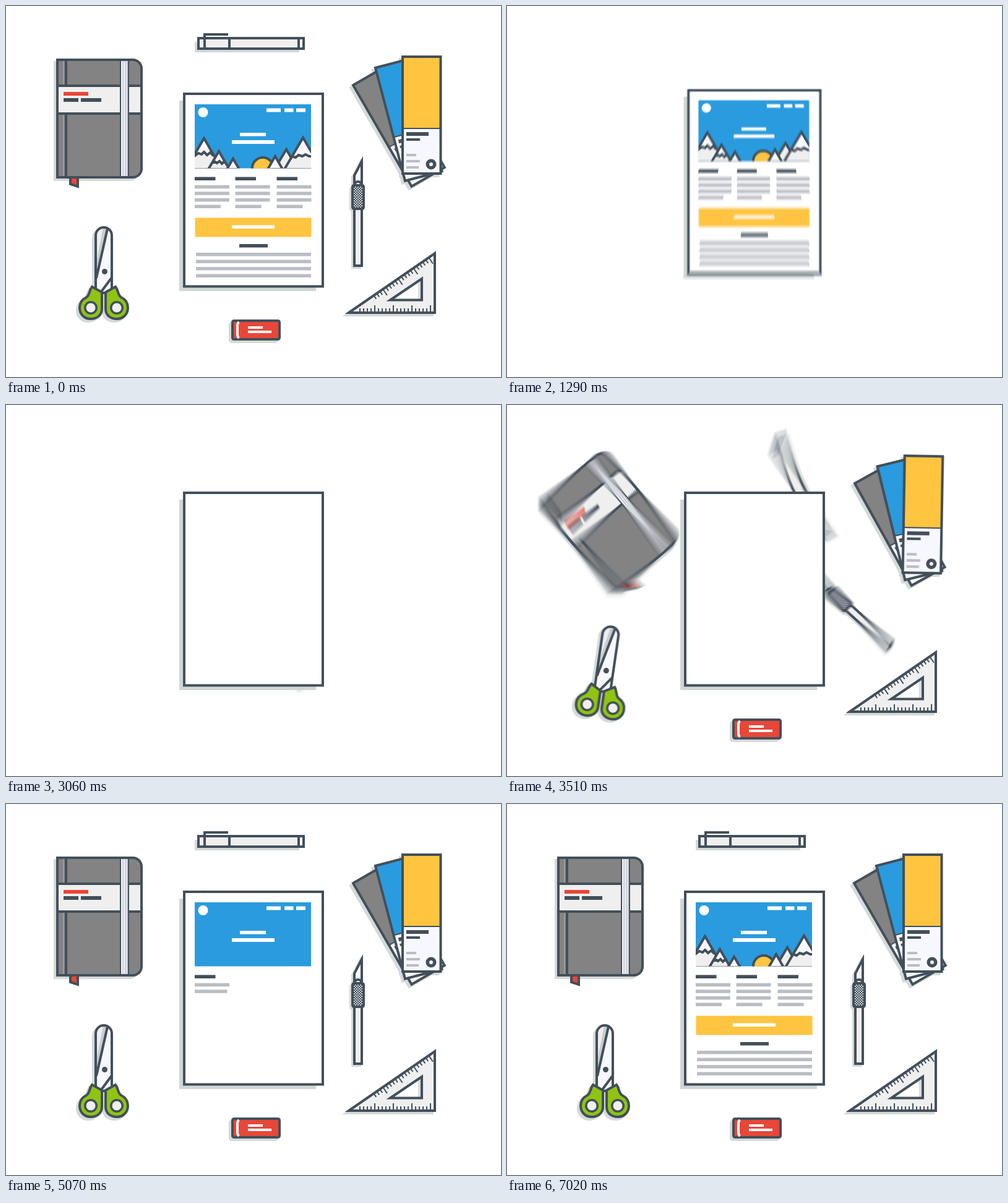
An HTML page with a canvas for the animation above (7.35 s loop, 800 px wide and 600 px high).

```html
<!DOCTYPE html>
<html lang="en">
<head>
<meta charset="utf-8">
<title>Design desk</title>
<style>
html, body { margin: 0; width: 100%; height: 100%; overflow: hidden; background: #fff; }
canvas { display: block; width: 800px; height: 600px; }
</style>
</head>
<body>
<canvas id="stage" width="800" height="600"></canvas>
<script>
const LOOP = 7350, STEP = 30, SHUTTER = 13, SAMPLES = 16, BACK = 1.2;
const INK = '#434f5b', SHADE = '#d3dad8', PALE = '#efefef', ICE = '#f7f7ff', GREY = '#838383',
  BLUE = '#2a9bde', YELLOW = '#ffc540', RED = '#e84738', GREEN = '#8fc412', LINE = '#babdc4', WHITE = '#fff';

const out = document.getElementById('stage').getContext('2d');
const layer = document.createElement('canvas');
layer.width = 800;
layer.height = 600;
const g = layer.getContext('2d');

const clamp = x => Math.max(0, Math.min(1, x));
const span = (t, start, length) => clamp((t - start) / length);
const easeOut = u => 1 - (1 - u) ** 3;
const backIn = (u, s = BACK) => u * u * ((s + 1) * u - s);

function shape(d, fill, width = 4, stroke = INK) {
  const p = new Path2D(d);
  if (fill) { g.fillStyle = fill; g.fill(p); }
  if (width) { g.lineWidth = width; g.strokeStyle = stroke; g.stroke(p); }
}
function bar(x, y, x2, y2, fill) {
  g.fillStyle = fill;
  g.fillRect(x, y, x2 - x, y2 - y);
}
function dot(x, y, r, fill) {
  g.fillStyle = fill;
  g.beginPath();
  g.arc(x, y, r, 0, 7);
  g.fill();
}
function place(x, y, deg, scale, draw) {
  g.save();
  g.translate(x, y);
  g.rotate(deg * Math.PI / 180);
  g.scale(scale, scale);
  draw();
  g.restore();
}
const shade = (d, dx = -4, dy = 4) => place(dx, dy, 0, 1, () => shape(d, SHADE, 4, SHADE));

function pen() {
  bar(305, 58, 474, 75, SHADE);
  shape('M311 52H481V69H311Z', PALE);
  bar(475, 54, 479, 67, WHITE);
  shape('M361 52V69M473 52V69M321 69V46H359');
}

function book() {
  shape('M77 89H200A13 13 0 0 1 213 102V270A13 13 0 0 1 200 283H77Z', SHADE, 0);
  shape('M104 276V288L116 292V276Z', RED);
  const cover = 'M83 87H205A14 14 0 0 1 219 101V263A14 14 0 0 1 205 277H83Z';
  shape(cover, GREY, 0);
  bar(92, 87, 94, 277, '#9b9c98');
  bar(95, 87, 99, 277, INK);
  shape('M83 129H219V174H83Z', PALE);
  bar(93, 139, 133, 145, RED);
  bar(93, 149, 117, 155, INK);
  bar(121, 149, 154, 155, INK);
  bar(184, 87, 199, 277, INK);
  bar(186, 87, 197, 277, ICE);
  for (const x of [188.5, 192, 195]) bar(x, 87, x + 1.5, 277, LINE);
  shape(cover);
}

function scissors() {
  const blade = 'M145 464V371A13 13 0 0 1 171 371V464Z';
  const grip = 'M139 454L155 463V490C155 500 147 506 137 506C126 506 119 498 119 488' +
    'C119 480 124 474 130 471C136 467 134 460 139 454Z';
  const flip = draw => { g.save(); g.translate(316, 0); g.scale(-1, 1); draw(); g.restore(); };
  shade(blade);
  shade(grip);
  flip(() => shade(grip, 4, 4));
  shape(blade, ICE, 0);
  shape('M145 440V371A13 13 0 0 1 164 360Z', '#c9cdd2', 0);
  shape('M145 420V371A13 13 0 0 1 157 358Z', PALE, 0);
  shape('M164 360L146 440M171 439L154 462');
  shape(blade);
  dot(159.5, 429.5, 4.5, INK);
  const handle = () => {
    shape(grip, GREEN);
    dot(137, 488, 11, INK);
    dot(137, 488, 7.5, PALE);
  };
  handle();
  flip(handle);
}

const CARDS = [[561, 128, -30, GREY], [597, 100, -14.7, BLUE], [641, 82, 0, YELLOW]];
function swatches() {
  const card = 'M0 0H61.5V189H0Z';
  for (const [x, y, deg] of CARDS) place(x - 4, y + 4, deg, 1, () => shape(card, SHADE, 4, SHADE));
  for (const [x, y, deg, fill] of CARDS) place(x, y, deg, 1, () => {
    shape(card, ICE, 0);
    bar(0, 0, 61.5, 116, fill);
    bar(0, 115, 61.5, 117, INK);
    bar(6, 122, 42, 128, INK);
    bar(6, 132, 28, 136, INK);
    [16, 22, 20].forEach((w, i) => bar(6, 157 + i * 10, 6 + w, 161 + i * 10, LINE));
    dot(46, 174, 8.5, INK);
    dot(46, 174, 3, ICE);
    shape(card);
  });
}

function knife() {
  const blade = 'M575 251V286H563V274Z', shaft = 'M563 328H575V420H563Z';
  const grip = 'M563 290H575Q578 290 578 293V325Q578 328 575 328H563Q560 328 560 325V293Q560 290 563 290Z';
  [blade, grip, shaft].forEach(d => shade(d, -3, 3));
  shape(blade, ICE);
  shape('M563 290Q564 284 569 284Q574 284 575 290Z', PALE);
  shape(shaft, PALE);
  shape(grip, '#c8cbd0', 0);
  for (let i = 0; i < 9; i++)
    for (let j = i % 2; j < 19; j += 2) bar(560 + i * 2, 290 + j * 2, 562 + i * 2, 292 + j * 2, INK);
  shape(grip);
}

function ruler() {
  const body = 'M554 496L693 400V496Z';
  shade(body);
  shape(body, PALE);
  shape('M621 475.5L672 441V475.5Z', WHITE, 0);
  bar(666, 445, 670, 475, '#d9dcdf');
  shape('M621 475.5L672 441V475.5Z');
  for (let i = 0; i < 20; i++) {
    const x = 572 + i * 6;
    bar(x - 1, i % 5 == 4 ? 484 : 489, x + 1, 495, INK);
  }
  place(554, 496, -34.6, 1, () => {
    for (let i = 0; i < 19; i++) {
      const x = 49 + i * 6;
      bar(x - 1, 1, x + 1, i % 5 == 3 ? 12 : 7, INK);
    }
  });
}

function eraser() {
  const body = 'M369 509H439Q442 509 442 512V536Q442 539 439 539H369Q366 539 366 536V512Q366 509 369 509Z';
  shade(body);
  shape(body, RED);
  shape('M376.5 511Q374 513 374 517V531Q374 535 376.5 537', null, 4, WHITE);
  bar(391, 518, 415, 522, WHITE);
  bar(391, 525, 429, 529, WHITE);
}

// x, y: turning point; leave, enter: start times; bulge: sideways swing of the path
const ITEMS = [
  { draw: eraser, x: 404, y: 524, leave: 100, enter: 3022, bulge: 55, recoil: true },
  { draw: ruler, x: 622, y: 448, leave: 130, enter: 3076 },
  { draw: swatches, x: 635, y: 187, leave: 155, enter: 3130 },
  { draw: scissors, x: 158, y: 433, leave: 180, enter: 3288 },
  { draw: book, x: 150, y: 182, leave: 205, enter: 3390 },
  { draw: knife, x: 569, y: 335, leave: 230, enter: 3398 },
  { draw: pen, x: 396, y: 60, leave: 255, enter: 3453, bulge: 86 }
];

function drawItem(it, t) {
  let away, deg;
  if (t < 2000) {
    const w = span(t, it.leave, 300);
    if (w >= 1) return;
    away = it.recoil ? backIn(w) : w * w;
    deg = 180 * w * w;
  } else {
    const v = 1 - span(t, it.enter, 400);
    if (v >= 1) return;
    away = v ** 8.5;
    deg = -210 * backIn(v);
  }
  const swing = t < 2000 ? 0 : (it.bulge || 0) * 4 * away * (1 - away);
  place(it.x + (400 - it.x) * away + swing, it.y + (298 - it.y) * away, deg, 1, () => {
    g.translate(-it.x, -it.y);
    it.draw();
  });
}

const PEAKS = [
  { start: 5310, d: 'M295 257L320 214L349 264H295Z', snow: 'M300 246L311 238L316 240L320 236L325 241L330 237L335 242', rest: 'L349 264H295Z' },
  { start: 5430, d: 'M327 264L344 235L361 264Z', snow: 'M333 254L338 252L341 254L345 251L349 255L352 252L356 254', rest: 'L361 264H327Z' },
  { start: 5550, d: 'M357 264L367 247L377 264Z' },
  { start: 5850, sun: true },
  { start: 5700, d: 'M434 264L453 232L472 264Z', fill: PALE },
  { start: 5580, d: 'M450 264L480 213L510 264Z', snow: 'M462 243L468 245L473 241L479 243L484 240L490 243L498 243', rest: 'L510 264H450Z' },
  { start: 5950, d: 'M423 264L435 243L447 264Z' }
];

function mountains(t) {
  g.save();
  g.beginPath();
  g.rect(305, 159, 188, 103.5);
  g.clip();
  for (const p of PEAKS) {
    const u = span(t, p.start, 210);
    if (!u) continue;
    place(0, 56 * (1 - easeOut(u)), 0, 1, () => {
      if (p.sun) return shape('M398 262A17 17 0 0 1 432 262V270H398Z', YELLOW);
      shape(p.d, p.fill || ICE, 0);
      if (p.snow) {
        g.save();
        g.clip(new Path2D(p.d));
        shape(p.snow + p.rest, PALE, 0);
        shape(p.snow);
        g.restore();
      }
      shape(p.d);
    });
  }
  g.restore();
}

function content(t) {
  const type = (x, y, x2, y2, fill, start, length) => {
    const u = span(t, start, length);
    if (u) bar(x, y, x + (x2 - x) * u, y2, fill);
  };
  type(305, 159, 493, 262.5, BLUE, 4570, 120);
  dot(318.5, 172, 8 * span(t, 4670, 60), WHITE);
  [[421, 444], [450, 464.5], [469, 484]].forEach(([a, b], i) => type(a, 165.5, b, 171.5, WHITE, 4690 + i * 30, 30));
  type(378, 205, 420, 210.5, WHITE, 4770, 35);
  type(365, 217, 434, 223, WHITE, 4800, 40);
  mountains(t);
  [305, 370.5, 437.5].forEach((x, c) => {
    const start = 4835 + c * 400;
    type(x, 276.5, x + 33.5, 282, INK, start, 80);
    for (let i = 0; i < 4; i++) {
      const y = 289.7 + i * 10.6;
      type(x, y, x + (i < 3 ? 56 : 42), y + 5.5, LINE, start + 80 * (i + 1), 80);
    }
  });
  type(305.5, 342.5, 493.5, 373.5, YELLOW, 5920, 140);
  type(365, 354.5, 434, 360, WHITE, 6120, 90);
  type(377, 385, 423, 390.5, INK, 6210, 90);
  for (let i = 0; i < 4; i++) {
    const y = 399 + i * 11.5;
    type(307, y, 493, y + 5.5, LINE, 6300 + i * 180, 180);
  }
}

function page(t) {
  let lift = 0, scale = 1;
  if (t < 1600) {
    const e = backIn(span(t, 940, 575), 1.15);
    lift = 274 * e;
    scale = 1 - Math.max(0, e);
  } else {
    scale = 1 - backIn(1 - span(t, 2070, 330));
  }
  if (scale <= 0.001) return;
  place(397, 300 - lift, 0, scale, () => {
    g.translate(-397, -300);
    bar(280, 153, 501, 461, '#cdd7d3');
    shape('M288 142H512V453.5H288Z', WHITE);
    content(t < 1600 ? LOOP : t);
  });
}

function scene(t) {
  bar(0, 0, 800, 600, WHITE);
  ITEMS.forEach(it => drawItem(it, t));
  page(t);
}

const MOVING = [[120, 570], [960, 1530], [2100, 2400], [3060, 3870]];

// Moving spans are averaged over a short shutter
function render(t) {
  const n = MOVING.some(([a, b]) => t >= a && t <= b) ? SAMPLES : 1;
  for (let i = 0; i < n; i++) {
    scene(t - SHUTTER * i / n);
    out.globalAlpha = 1 / (i + 1);
    out.drawImage(layer, 0, 0);
  }
}

let begin = null, shown = 0;
function tick(now) {
  if (begin === null) begin = now;
  const t = Math.floor(((now - begin) % LOOP) / STEP) * STEP;
  if (t !== shown) render(shown = t);
  requestAnimationFrame(tick);
}
render(0);
requestAnimationFrame(tick);
</script>
</body>
</html>
```
